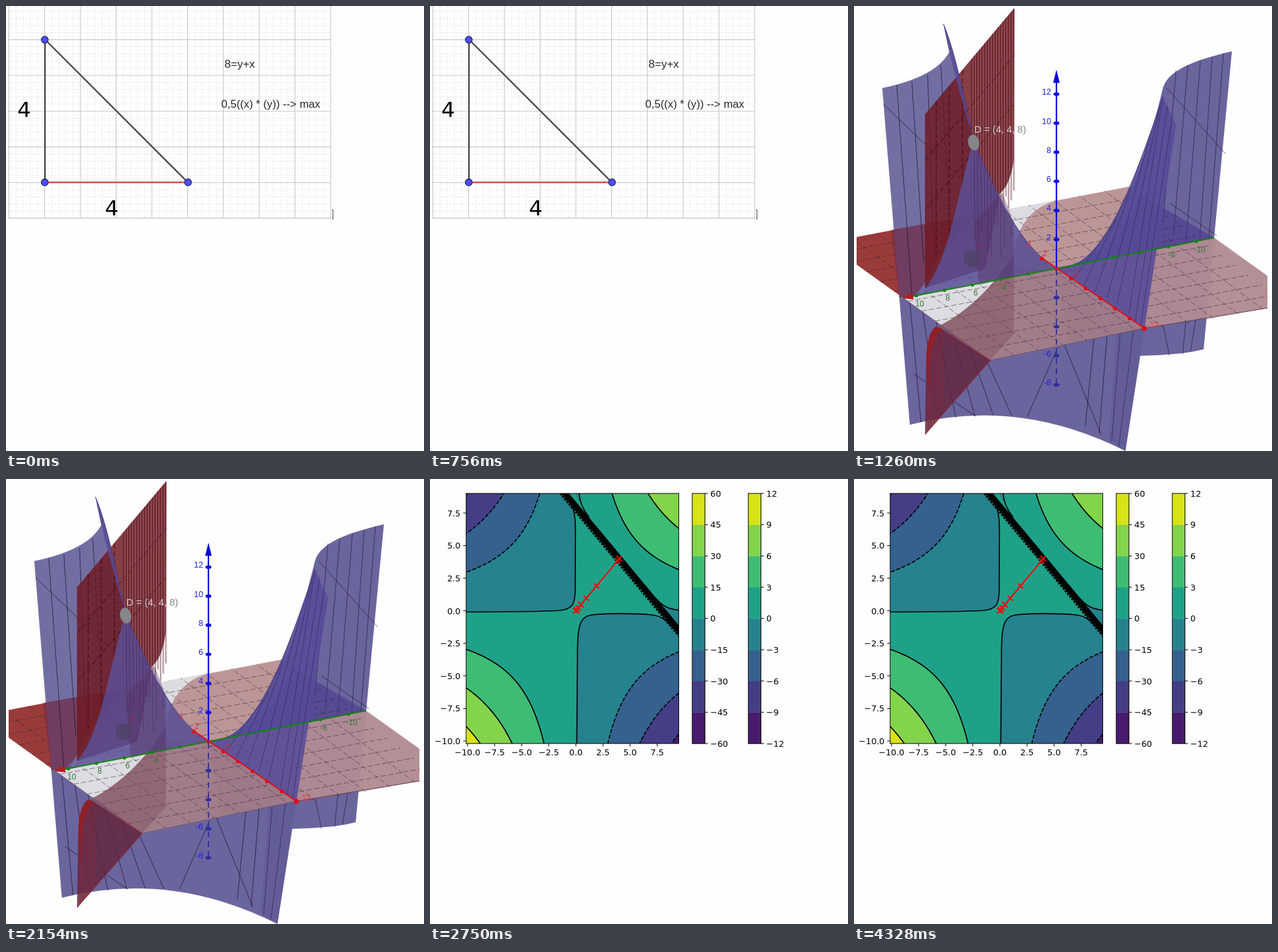
An HTML page that plays this animation: 636 px wide and 678 px high, repeating every 5380 ms.

```html
<!DOCTYPE html>
<html lang="en">
<head>
<meta charset="utf-8">
<title>Largest triangle</title>
<style>
html, body { margin: 0; width: 100%; height: 100%; overflow: hidden; background: #fefefe; }
svg { display: block; width: 636px; height: 678px; }
.arial { font-family: "Liberation Sans", Arial, sans-serif; }
.dejavu { font-family: "DejaVu Sans", sans-serif; }
</style>
</head>
<body>
<svg id="stage" viewBox="0 0 636 678" xmlns="http://www.w3.org/2000/svg">
  <defs>
    <clipPath id="plotClip"><rect x="55" y="22" width="323.5" height="381"/></clipPath>
    <clipPath id="leftClip"><rect x="4" y="0" width="625" height="678"/></clipPath>
  </defs>
  <g id="triangle"></g>
  <g id="surface" clip-path="url(#leftClip)"></g>
  <g id="contour"></g>
</svg>
<script>
const NS = "http://www.w3.org/2000/svg";
const scenes = ["triangle", "surface", "contour"].map(id => document.getElementById(id));

function add(parent, tag, attrs, text) {
  const el = document.createElementNS(NS, tag);
  for (const k in attrs) el.setAttribute(k, attrs[k]);
  if (text !== undefined) el.textContent = text;
  parent.appendChild(el);
  return el;
}
const path = (g, d, fill, more) => add(g, "path", { d, fill, ...more });
const stroke = (g, d, color, width = 1, more) =>
  path(g, d, "none", { stroke: color, "stroke-width": width, ...more });
const label = (g, x, y, text, size, cls, fill = "#000", anchor = "start") =>
  add(g, "text", { x, y, "font-size": size, class: cls, fill, "text-anchor": anchor }, text);
const dot = (g, x, y, r, fill, more) => add(g, "circle", { cx: x, cy: y, r, fill, ...more });

function drawTriangle(g) {
  const step = 54.4, top = 51.4, left = 4.4;
  let minor = "", major = "";
  for (let i = 0; i <= 45; i++) {
    const x = left + i * step / 5;
    if (i % 5) minor += `M${x} 0V323`;
    else major += `M${x} 0V323`;
  }
  for (let i = -4; i <= 25; i++) {
    const y = top + i * step / 5;
    if (i % 5) minor += `M4 ${y}H494`;
    else major += `M3 ${y}H495`;
  }
  stroke(g, minor, "#e9e9e9", 1, { "stroke-dasharray": "3 2" });
  stroke(g, major, "#c6c6c6", 1.1);
  stroke(g, "M59.3 51V269M59.3 51L277 269", "#4a4a4a", 2.4);
  stroke(g, "M59 268.7H277", "#bd5f48", 2.4);
  for (const [x, y] of [[59, 51.3], [59, 268.7], [277, 268.7]])
    dot(g, x, y, 5.2, "#4d4dff", { stroke: "#26266e", "stroke-width": 1.3 });
  label(g, 17.3, 169, "4", 32.5, "dejavu");
  label(g, 150.5, 318.5, "4", 32.5, "dejavu");
  label(g, 332.5, 94, "8=y+x", 17, "arial", "#2a2a2a");
  label(g, 327.5, 154.5, "0,5((x) * (y)) --> max", 16.7, "arial", "#2a2a2a");
  stroke(g, "M496 310.5H497.5V324.5H496", "#444");
}

// Oblique view of the space
const view = (x, y, z = 0) => [308 - 10.6 * x - 21.3 * y, 400 - 7.7 * x + 4.15 * y - 22.15 * z];

// Base plane from its four corners, u and v in 0..1
const base = [[207, 540], [660, 455], [-43, 360], [420, 275]];
const weight = (u, v) => [(1 - u) * (1 - v), u * (1 - v), (1 - u) * v, u * v];
const onBase = (u, v) => [0, 1].map(k => weight(u, v).reduce((sum, w, i) => sum + w * base[i][k], 0));

function drawSurface(g) {
  const ink = "#17142c", wall = "#6a659d";
  path(g, "M4 352L420 275L636 416V459L207 540L75 445L4 394Z", "#dcdce2");
  path(g, "M4 352L108 332L190 318Q150 350 120 400L98 440L75 445L4 394Z", "#993b3a");
  path(g, "M420 275L548 353L308 400H241C240 350 264 304 312 296Z", "#bc9596");

  // Rear wall, then the near half of the base plane
  path(g, "M470 125C478 97 520 82 575 69L548 353L532 523Q480 537 330 532L308 400C390 400 440 250 470 125Z", wall);
  stroke(g, "M490 98L470 330M508 90L486 350M527 83L505 360M545 78L526 357M562 72L540 354M476 125L565 225M480 300L552 350M505 480L500 530M520 478L512 526M470 485L480 533", ink, .8, { opacity: .75 });
  path(g, "M118 492C165 475 215 425 243 378V400H308L548 353L636 416V459L442 491L207 540Z", "#b38c93", { opacity: .95 });
  path(g, "M118 492C165 475 215 425 243 378V400H308L442 491L207 540Z", "#8f6c80", { opacity: .5 });
  path(g, "M436 287L548 353L308 400Q395 385 436 287Z", "#42308a", { opacity: .5 });

  let mesh = "";
  for (let i = 1; i < 12; i++) {
    const s = i / 12;
    mesh += `M${onBase(s, 0)}L${onBase(s, 1)}M${onBase(0, s)}L${onBase(1, s)}`;
  }
  stroke(g, mesh, "#34262f", .9, { "stroke-dasharray": "8 3.5", opacity: .62 });
  stroke(g, "M75 445L207 540L442 491L636 459", "#6d3a48", 1);

  // Left wall and lower front panel
  path(g, "M43 125Q125 108 145 70L136 27C152 65 172 155 182 205C155 290 140 425 92 441L69 445Z", wall, { opacity: .94 });
  path(g, "M57 341L108 332L152 325Q130 400 92 441L69 445Z", "#75283f", { opacity: .62 });
  path(g, "M69 445H75L207 540L442 491L413 678Q250 596 85 638Z", wall);
  stroke(g, "M65 120L88 440M88 115L106 390M112 105L120 340M132 90L145 310M45 150L170 270M85 452L102 634M105 467L128 630M125 482L155 627M150 500L184 625M175 518L212 624M200 536L240 624M310 520L264 625M320 516L376 653M365 507L352 640M385 503L373 651M405 499L392 664M425 495L403 671M90 560L185 625", ink, .9, { opacity: .8 });

  // Red curtain above and below the plane
  path(g, "M108 165L244 3L243 235Q238 272 222 286L200 400L122 425L108 430Z", "#701a22", { opacity: .84 });
  stroke(g, "M108 235L244 75M108 310L243 150M125 145V380M145 122V350M165 98V325", "#2b070d", .9, { "stroke-dasharray": "8 4" });
  let folds = "";
  for (let i = 0; i < 17; i++) {
    const x = 179 + i * 4;
    folds += `M${x} ${81 - i * 4.8}V${355 - i * 4 + 13 * Math.sin(i * 2.3)}`;
  }
  stroke(g, folds, "#390b18", 1, { opacity: .75 });
  stroke(g, folds, "#c77780", .6, { opacity: .6, transform: "translate(1.6 2)" });
  path(g, "M118 492C165 475 215 425 243 378V500L207 540Z", "#7c4f57", { opacity: .45 });
  path(g, "M108 653L110 535Q112 493 130 490L207 540Z", "#642641", { opacity: .85 });
  stroke(g, "M113 515V645M117 503V641M122 496V636M127 493V630M133 493V625M130 490L207 540L108 653", "#8c2934", 1.1);
  path(g, "M130 490L124 489Q109 500 110 550L114 590Q112 505 135 493Z", "#8f2028");

  // Saddle lobes
  path(g, "M136 27C156 75 168 145 182 205C220 296 258 372 308 399L92 441C140 425 155 290 182 205C166 150 147 86 136 27Z", "#574d94", { opacity: .84 });
  path(g, "M308 399C380 407 430 255 470 138L490 181L442 491Z", "#574b9a", { opacity: .86 });
  path(g, "M442 491L445 470L413 678L388 660L400 500Z", "#534b8c", { opacity: .35 });
  stroke(g, "M470 138L418 470M477 152L428 480M484 168L436 488M465 155L400 455M452 190L385 445M438 230L367 435M420 280L350 425M400 325L335 415", ink, .7, { opacity: .6 });
  let ribs = "";
  for (let i = 0; i < 12; i++) {
    const x = 183 + i * 5;
    ribs += `M${x} ${209 + i * 11.3}L${x + 1} ${355 + 35 * Math.sin(i * 1.7)}`;
  }
  stroke(g, ribs, "#4a2054", .9, { opacity: .65 });
  path(g, "M182 330L226 285L243 330V412L190 425Z", "#532f5c", { opacity: .4 });
  stroke(g, "M136 27C156 75 168 145 182 205C220 296 258 372 308 399C380 407 430 255 470 138", "#463d8a", 1);

  // Axes
  stroke(g, "M75 445L308 400L548 353", "#128012", 2);
  path(g, "M73 445L88 437L91 447Z", "#b51c20");
  for (let y = -10; y <= 10; y += 2) dot(g, ...view(0, y), 2.5, "#188018");
  for (const y of [10, 8, 6, 4, -8, -10]) {
    const [lx, ly] = view(0, y);
    label(g, lx + 5, ly + 16, y, 12, "arial", "#2f7a35", "middle");
  }
  stroke(g, "M286 384L442 491", "#e60a14", 2);
  for (let i = -1; i <= 6; i++) dot(g, 308 + i * 22.3, 400 + i * 15.2, i == 6 ? 4 : 3, "#d9101c");
  label(g, 446, 490, "-12", 12, "arial", "#e8333a");
  label(g, 266, 366, "4", 12, "arial", "#cf3144", "middle");
  label(g, 290, 381, "2", 12, "arial", "#cf3144", "middle");
  label(g, 336, 412, "-2", 12, "arial", "#cf3144", "middle");
  stroke(g, "M308 398V112", "#0808d8", 2.2);
  stroke(g, "M308 402V580", "#30309c", 1.8, { "stroke-dasharray": "9 6" });
  path(g, "M308 97L303 117H313Z", "#0808d8");
  for (let z = -8; z <= 12; z += 2) {
    if (!z) continue;
    const y = 400 - z * 22.15;
    add(g, "ellipse", { cx: 308, cy: y, rx: 4.5, ry: 2.7, fill: z > 0 ? "#1010e0" : "#30309c" });
    if (z > 0 || z < -5) label(g, 300, y + 1, z, 12.5, "arial", "#2020dd", "end");
  }
  dot(g, 180, 385, 13, "#514168", { opacity: .8 });
  label(g, 188, 369, "A", 12, "arial", "#903050");
  add(g, "ellipse", { cx: 182, cy: 208, rx: 8.5, ry: 12, fill: "#85858a", transform: "rotate(-12 182 208)" });
  label(g, 183, 193, "D = (4, 4,", 14.9, "arial", "#d0d0d0");
  label(g, 262, 193, "8)", 14.9, "arial", "#858585", "end");
}

function drawContour(root) {
  const px = x => 222 + x * 16.49, py = y => 200.7 - y * 19.84;
  const colors = ["#481b6d", "#433e85", "#34618d", "#26828e", "#1fa188", "#3fbc73", "#84d44b", "#d8e219"];
  const g = add(root, "g", { "clip-path": "url(#plotClip)" });
  add(g, "rect", { x: 55, y: 22, width: 324, height: 381, fill: colors[4] });

  const upper = "M50 202.5C110 202.5 165 202 195 200.5C217 199 220.5 191 221 170L221.3 75C221 48 216 33 203 18";
  const lower = "M223.3 408L224.5 255C225 222 230 210 244 207.5C260 204.5 315 204.5 337 207C357 209 363 220 382 238";
  path(g, upper + "H50Z", colors[3]);
  path(g, lower + "V408Z", colors[3]);
  path(g, "M344 182C354 194 364 199 382 200V238Z", colors[3]);
  path(g, "M218 18L227 18Q226 38 242 58Z", colors[3]);

  // Branch of x*y = c in the quadrant given by the signs
  function branch(c, sx, sy) {
    const pts = [];
    for (let i = 0; i <= 60; i++) {
      const x = c / 11.5 * Math.pow(11.5 * 11.5 / c, i / 60);
      pts.push(`${px(sx * x).toFixed(1)} ${py(sy * c / x).toFixed(1)}`);
    }
    return "M" + pts.join("L");
  }
  const lines = [];
  for (const [sx, sy] of [[1, 1], [-1, -1], [-1, 1], [1, -1]])
    for (let n = 1; n <= 3; n++) {
      const d = branch(30 * n, sx, sy), plus = sx === sy;
      path(g, `${d}L${px(sx * 12)} ${py(sy * 12)}Z`, colors[plus ? 4 + n : 3 - n]);
      lines.push([d, plus ? "none" : "6 2.6"]);
    }
  for (const [d, dash] of lines) stroke(g, d, "#000", 1.7, { "stroke-dasharray": dash });
  stroke(g, upper + lower + "M344 182C354 194 364 199 382 200M227 18Q226 38 242 58", "#000", 1.7);

  // Constraint x + y = 8
  const limit = `M${px(-1.4)} ${py(9.4)}L${px(9.8)} ${py(-1.8)}`;
  stroke(g, limit, "#000", 9.5);
  stroke(g, limit, "#000", 4, { "stroke-dasharray": "3.4 1.8", transform: "translate(-3.9 3.3)" });
  stroke(g, limit, "#1d6964", .9, { "stroke-dasharray": "1.5 3.7", transform: "translate(-2.3 2)" });

  stroke(g, `M${px(0)} ${py(0)}L${px(4)} ${py(4)}`, "#f00", 2);
  let marks = "";
  for (const v of [0, .06, .22, .46, .96, 1.9, 3.83, 4])
    marks += `M${px(v) - 4} ${py(v) - 4}l8 8m0 -8l-8 8`;
  stroke(g, marks, "#f00", 2);

  add(root, "rect", { x: 55, y: 22, width: 323.5, height: 381, fill: "none", stroke: "#000", "stroke-width": 1 });
  const num = v => v.toFixed(1).replace("-", "−");
  for (let v = -10; v <= 7.5; v += 2.5) {
    stroke(root, `M${px(v)} 403v4.5M55 ${py(v)}h-4.5`, "#000");
    label(root, px(v), 421, num(v), 12.8, "dejavu", "#000", "middle");
    label(root, 46.5, py(v) + 4.8, num(v), 12.8, "dejavu", "#000", "end");
  }
  function bar(x, unit) {
    const h = 381 / 8;
    colors.forEach((c, i) => add(root, "rect", { x, y: 403 - (i + 1) * h, width: 19.3, height: h + .3, fill: c }));
    add(root, "rect", { x, y: 22, width: 19.3, height: 381, fill: "none", stroke: "#000", "stroke-width": 1 });
    for (let i = 0; i <= 8; i++) {
      const y = 403 - i * h;
      stroke(root, `M${x + 19.3} ${y}h4.5`, "#000");
      label(root, x + 27.5, y + 4.8, String((i - 4) * unit).replace("-", "−"), 12.8, "dejavu");
    }
  }
  bar(399, 15);
  bar(484.3, 3);
}

drawTriangle(scenes[0]);
drawSurface(scenes[1]);
drawContour(scenes[2]);

const start = performance.now();
function update(now) {
  const t = Math.max(0, now - start) % 5380;
  const shown = t < 1260 ? 0 : t < 2750 ? 1 : 2;
  scenes.forEach((s, i) => s.setAttribute("display", i === shown ? "inline" : "none"));
  requestAnimationFrame(update);
}
update(start);
</script>
</body>
</html>
```
